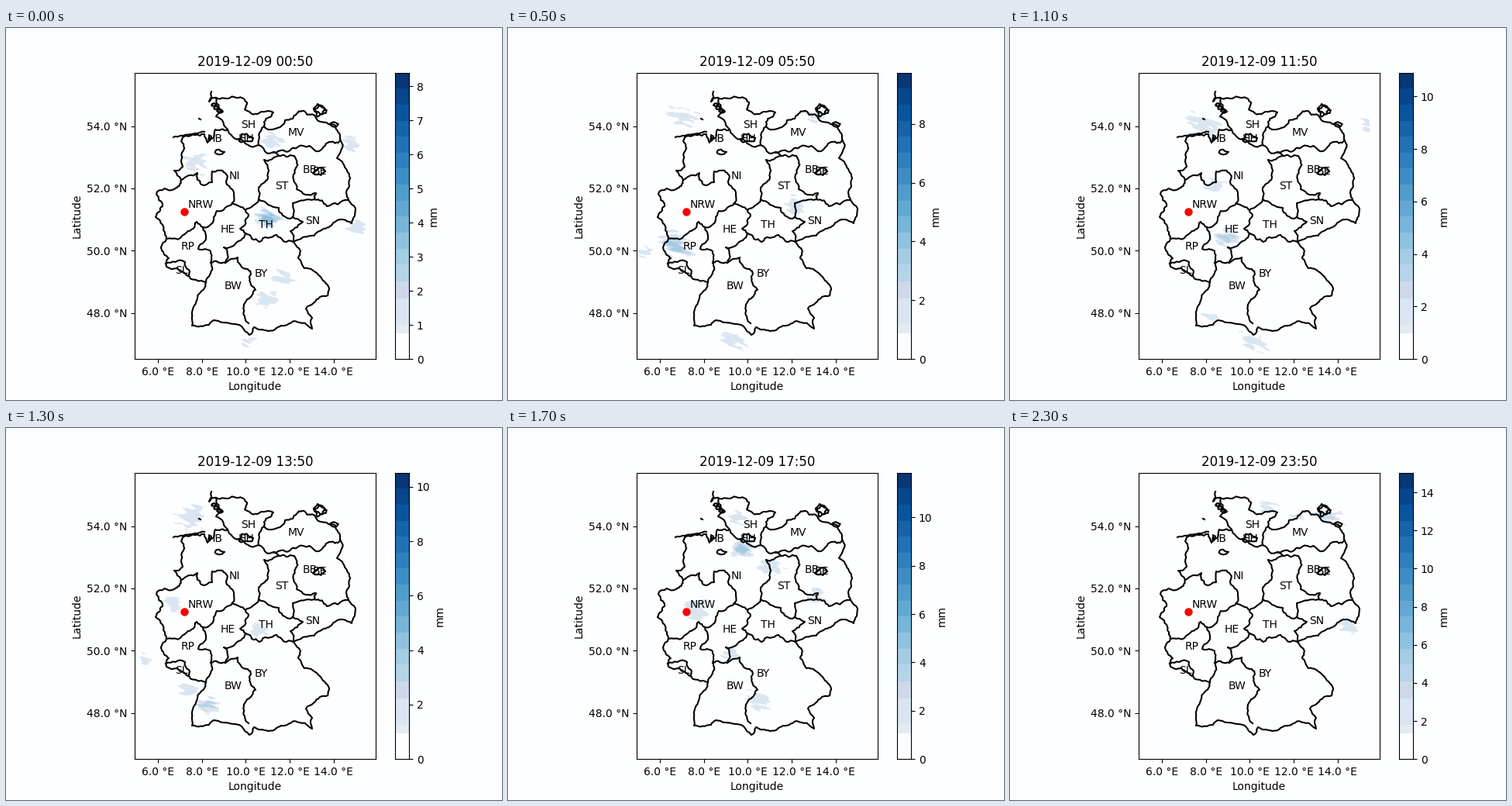
Animation of 640x480 px, one loop 2400 ms. Source, as a matplotlib script:

```python
import numpy as np
import matplotlib.pyplot as plt
from matplotlib.animation import FuncAnimation
from matplotlib.colors import BoundaryNorm, ListedColormap

HOURS = 24
PAPER = "#fdfeff"
LEFT, RIGHT, TOP, BOTTOM = 166.3, 476.8, 57.6, 427.2  # map box in stage pixels
rng = np.random.default_rng(9)

plt.rcParams["font.family"] = "DejaVu Sans"
fig = plt.figure(figsize=(6.4, 4.8), dpi=100, facecolor=PAPER)


def add_axes(x0, x1):
    return fig.add_axes([x0 / 640, 1 - BOTTOM / 480, (x1 - x0) / 640, (BOTTOM - TOP) / 480],
                        facecolor=PAPER)


def lon_px(lon):
    return 26.6 + 28.28 * lon


def lat_px(lat):
    return 2297.35 - 40.2 * lat


ax = add_axes(LEFT, RIGHT)
cax = add_axes(501.6, 520.1)

# Colour scale in fractions of the hourly maximum
edges = np.r_[0, 0.09, 0.12, 0.212, 0.27, np.linspace(0.33, 1, 13)]
mids = (edges[:-1] + edges[1:]) / 2
cmap = ListedColormap([PAPER, "#e6eaf3", "#d9e6f2", "#cdd9ea", "#b5d3e9",
                       *plt.cm.Blues(mids[5:])])
norm = BoundaryNorm(edges, cmap.N)

# Hour: maximum in mm, then rain cells (x, y, radius) with the heaviest first
rain_keys = {
    0: (8.4, [(338, 245, 11), (355, 321, 11), (241, 175, 15), (343, 146, 13),
              (445, 150, 10), (335, 350, 11), (452, 255, 11), (315, 403, 8)]),
    5: (9.74, [(215, 278, 14), (226, 112, 14), (174, 290, 9), (370, 230, 10),
               (395, 115, 9), (290, 401, 11)]),
    9: (11.3, [(252, 264, 11), (235, 365, 8), (224, 118, 16), (440, 118, 9),
               (239, 196, 10), (290, 397, 12)]),
    13: (10.52, [(260, 357, 10), (326, 261, 9), (238, 112, 16), (237, 338, 10),
                 (178, 300, 8), (215, 226, 9)]),
    15: (10.25, [(275, 152, 11), (217, 228, 14), (312, 175, 13), (268, 110, 10),
                 (371, 210, 10), (262, 285, 10), (300, 345, 13)]),
    19: (13.46, [(274, 151, 11), (266, 128, 12), (345, 284, 9), (442, 328, 13),
                 (331, 102, 8)]),
    23: (15.04, [(408, 112, 13), (437, 255, 11), (331, 103, 10), (372, 113, 7)]),
}
hours = np.array(list(rain_keys))
maxima = [top for top, _ in rain_keys.values()]

HEAVY_MM, LIGHT = 3.4, 0.2
DRIFT = np.array([13, 3])  # pixels per hour
TILT = 0.25
X, Y = np.meshgrid(np.arange(311) + LEFT, np.arange(370) + TOP)


def streak_noise(length=4.0, width=1.2):
    fy = np.fft.fftfreq(X.shape[0])[:, None]
    fx = np.fft.fftfreq(X.shape[1])[None, :]
    along, across = fx + TILT * fy, fy - TILT * fx
    blur = np.exp(-2 * np.pi**2 * ((along * length)**2 + (across * width)**2))
    n = np.fft.ifft2(np.fft.fft2(rng.standard_normal(X.shape)) * blur).real
    return n / n.std()


noise = streak_noise()


def rain_field(hour):
    """Cells of the nearest key hour, carried along by the wind and broken into streaks."""
    key = hours[np.argmin(abs(hours - hour))]
    top, cells = rain_keys[key]
    dx, dy = DRIFT * (hour - key)
    grain = 0.3 * np.roll(noise, (dy, dx), axis=(0, 1))
    field = np.zeros(X.shape)
    for i, (x, y, r) in enumerate(cells):
        px, py = X - x - dx, Y - y - dy
        d = np.hypot((px + TILT * py) / 1.35, py - TILT * px) / r
        peak = LIGHT if i else HEAVY_MM / top
        field = np.maximum(field, peak * np.clip(1.2 - d + grain, 0, 1))
    return np.ma.array(field, mask=(field < edges[1]) | (Y < 95) | (X > 464))


def border(*pts, rough=0.2):
    """Draw a line through the points, roughened by midpoint displacement."""
    p = np.array(pts, float)
    while True:
        step = np.diff(p, axis=0)
        long = np.flatnonzero(np.hypot(*step.T) > 4)
        if not len(long):
            break
        side = step[long, ::-1] * (-1, 1) * rng.uniform(-rough, rough, (len(long), 1))
        p = np.insert(p, long + 1, (p[long] + p[long + 1]) / 2 + side, axis=0)
    ax.plot(p[:, 0], p[:, 1], color="k", lw=1.5, zorder=3)


def ring(x, y, rx, ry, n=9):
    """Draw a small ragged closed shape."""
    t = np.linspace(0, 2 * np.pi, n, endpoint=False)
    r = rng.uniform(0.5, 1.1, n)
    pts = np.c_[x + rx * r * np.cos(t), y + ry * r * np.sin(t)]
    border(*pts, pts[0])


def draw_outline():
    # Baltic coast
    border((271, 90), (311, 96), (308, 105), (316, 110), (338, 107), (345, 109), (333, 121),
           (333, 127), (350, 129), (360, 119), (370, 117), (382, 107), (397, 112),
           (406, 121), (425, 126), (431, 143), (434, 154))
    # Polish and Czech border
    border((434, 154), (427, 168), (440, 184), (443, 204), (439, 213), (442, 222),
           (451, 233), (446, 252), (434, 247), (405, 262), (371, 276), (380, 288),
           (377, 297), (385, 310), (417, 336), (415, 345), rough=0.14)
    # Alps and upper Rhine
    border((415, 345), (405, 347), (387, 362), (395, 374), (395, 388), (386, 381),
           (355, 384), (338, 391), (320, 386), (314, 396), (304, 385), (280, 380),
           (268, 377), (262, 383), (240, 384), (241, 363), (258, 328), rough=0.14)
    # Western border
    border((258, 328), (233, 319), (207, 308), (210, 297), (200, 283), (207, 272),
           (203, 261), (193, 244), (202, 230), (194, 214), (217, 208), (226, 196),
           (217, 184), (228, 179), (230, 155))
    # North Sea coast
    border((230, 155), (226, 146), (232, 139), (256, 137), (260, 148), (270, 131),
           (286, 131), (279, 119), (271, 114), (280, 108), (271, 90))


def draw_states():
    border((286, 131), (300, 143), (326, 151), (352, 165))
    border((333, 127), (326, 151))
    border((345, 160), (377, 153), (404, 159), (417, 147), (431, 145))
    border((352, 165), (333, 170), (334, 199), (326, 206), (326, 221))
    border((352, 165), (372, 165), (371, 195), (375, 208), (400, 213), (398, 221))
    border((442, 222), (414, 230), (398, 221), (370, 226), (370, 244))
    border((370, 244), (357, 242), (352, 232), (338, 228), (326, 221), (309, 235), (292, 226))
    border((309, 235), (313, 242), (302, 259), (309, 265))
    border((309, 265), (327, 276), (349, 267), (371, 276))
    border((370, 244), (383, 250), (367, 262), (371, 276))
    border((309, 265), (303, 274), (281, 283), (283, 303), (264, 303))
    border((283, 303), (299, 296), (312, 311), (322, 338), (311, 350), (313, 381))
    border((258, 328), (266, 309), (264, 288), (248, 285), (257, 263), (254, 257))
    border((207, 272), (233, 264), (246, 250), (254, 257), (268, 247), (272, 236), (292, 226))
    border((292, 226), (294, 212), (285, 202), (283, 187), (266, 185), (266, 199),
           (252, 202), (247, 187), (226, 196))
    border((206, 304), (231, 302), (236, 312), (235, 320))


def draw_cities_and_islands():
    ring(309, 142, 10, 6)   # Hamburg
    ring(274, 160, 7, 4)    # Bremen
    ring(263, 142, 2, 4)    # Bremerhaven
    ring(405, 185, 9, 6)    # Berlin
    for r in (9, 6):
        ring(405, 106, r, r, 13)  # Rügen
    ring(422, 124, 6, 4)    # Usedom
    border((265, 82), (262, 95), (269, 90))  # Sylt
    for y in (99, 103, 107):
        ring(265 + (y - 95) * 0.8, y, 4, 2)  # North Frisian islands
    border((249, 117), (251, 118))
    for x in range(216, 254, 7):  # East Frisian islands
        y = 141 - (x - 216) * 0.18
        border((x, y), (x + 5, y - 0.8))


def draw_labels():
    names = {"SH": (303, 129), "MV": (364, 139), "HB": (260, 147), "HH": (300, 147),
             "NI": (288, 195), "BB": (383, 187), "BE": (396, 189), "ST": (347, 208),
             "NRW": (235, 232), "HE": (277, 264), "TH": (326, 258), "SN": (386, 253),
             "RP": (226, 286), "SL": (218, 317), "BW": (282, 337), "BY": (321, 321)}
    for name, (x, y) in names.items():
        ax.text(x, y, name, fontsize=10, zorder=5)


rain = ax.imshow(rain_field(0), cmap=cmap, norm=norm, extent=(LEFT, RIGHT, BOTTOM, TOP),
                 aspect="auto", interpolation="nearest", zorder=1)
draw_outline()
draw_states()
draw_cities_and_islands()
draw_labels()
ax.plot(229.5, 236.5, "o", color="red", ms=6.5, zorder=6)
ax.set(xlim=(LEFT, RIGHT), ylim=(BOTTOM, TOP), xlabel="Longitude", ylabel="Latitude")
lons, lats = range(6, 15, 2), range(48, 55, 2)
ax.set_xticks([lon_px(v) for v in lons], [f"{v:.1f} °E" for v in lons])
ax.set_yticks([lat_px(v) for v in lats], [f"{v:.1f} °N" for v in lats])
title = ax.set_title("")

cax.pcolormesh([0, 1], edges, mids[:, None], cmap=cmap, norm=norm)
cax.set(xlim=(0, 1), ylim=(0, 1), xticks=[])
cax.yaxis.tick_right()
cax.yaxis.set_label_position("right")
cax.set_ylabel("mm")


def update(hour):
    rain.set_data(rain_field(hour))
    title.set_text(f"2019-12-09 {hour:02d}:50")
    top = np.interp(hour, hours, maxima)
    ticks = np.arange(0, top, 1 if top < 9 else 2)
    cax.set_yticks(ticks / top, [f"{t:.0f}" for t in ticks])
    return rain, title


anim = FuncAnimation(fig, update, frames=HOURS, interval=100, repeat=True, repeat_delay=0)
plt.show()
```
